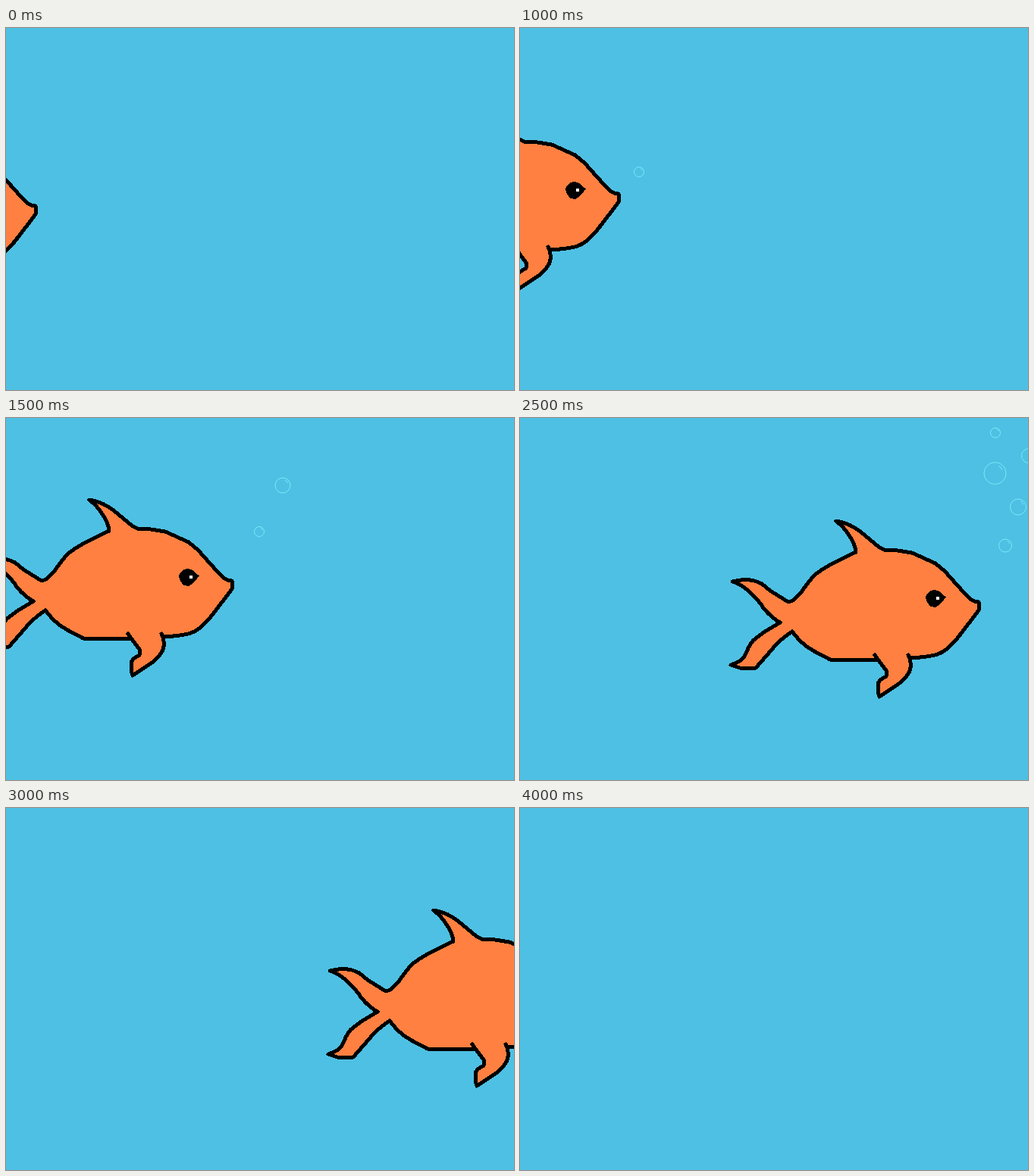
Animation of 670 by 478 pixels, one loop 4.5 s. Source, as an HTML page:

```html
<!DOCTYPE html>
<html lang="en">
<head>
<meta charset="utf-8">
<title>Swimming fish</title>
<style>
  html, body { margin: 0; height: 100%; overflow: hidden; background: #4ec0e3; }
  svg { display: block; width: 100%; height: 100%; }
  .outline { fill: #ff8040; stroke: #000; stroke-width: 5; stroke-linejoin: round; stroke-linecap: round; }
  .bubble { fill: none; stroke: #7ae9fb; stroke-width: 1; }
</style>
</head>
<body>
<svg viewBox="0 0 670 478">
  <g id="fish" shape-rendering="crispEdges">
    <!-- back, snout, belly and front fin, then tail and dorsal fin -->
    <path class="outline" d="M325 154 L343 155 362 158 393 172 405 182 430 210 439 219 444 222 450 223
      450 234 424 268 Q407 290 392 293 Q380 296 359 297 Q362 310 358 316 Q352 327 340 334 L319 348
      317 342 317 330 320 326 328 321 329 315 317 299 254 299 233 288 222 281 213 273 204 262
      Q187 273 176 287 L156 310 138 311 123 306 Q138 302 143 291 Q149 275 156 271 L168 262 188 250
      Q177 244 166 231 L163 226 Q142 200 125 196 Q148 190 164 199 L175 208 199 223 205 221
      216 210 Q231 188 238 184 Q251 174 288 157 Q287 143 270 123 L262 116 Q280 119 294 130 L307 141 318 150Z"/>
    <path class="outline" d="M317 299L313 293M359 297L357 293"/>
    <path d="M380 218L381 213 386 208 392 207 399 209 403 214 407 216 404 220 399 226 393 230 386 229 382 223Z"/>
    <circle cx="396" cy="218" r="2.5" fill="#fff"/>
  </g>
  <g id="bubbles"></g>
</svg>
<script>
const STEP = 500;

// Fish offset, and bubbles as [x, y, radius]
const poses = [
  { x: -411, y: 12, bubbles: [] },
  { x: -371, y: 4, bubbles: [] },
  { x: -320, y: -4, bubbles: [[157, 190, 7]] },
  { x: -152, y: -8, bubbles: [[365, 89, 10.5], [334, 150, 7]] },
  { x: 0, y: 0, bubbles: [[493, 58.5, 15], [452.5, 110, 10.5], [496, 125.5, 7], [472, 168, 11]] },
  { x: 155, y: 20, bubbles: [[627, 19.5, 7], [671, 50, 10], [626.5, 73, 15], [657, 117.5, 11], [640, 168.5, 9]] },
  { x: 302, y: 19, bubbles: [] },
  { x: 436, y: 9, bubbles: [] },
  { x: 700, y: 0, bubbles: [] }
];

const fish = document.getElementById("fish");
const bubbleLayer = document.getElementById("bubbles");
let shown = -1;

function bubbleMarkup([x, y, r]) {
  const glint = `M${x + r * .3} ${y - r * .65}Q${x + r * .55} ${y - r * .58} ${x + r * .62} ${y - r * .3}`;
  return `<circle class="bubble" cx="${x}" cy="${y}" r="${r - .5}"/><path class="bubble" d="${glint}"/>`;
}

function draw(now) {
  const index = Math.floor(now / STEP) % poses.length;
  if (index !== shown) {
    const pose = poses[index];
    fish.setAttribute("transform", `translate(${pose.x} ${pose.y})`);
    bubbleLayer.innerHTML = pose.bubbles.map(bubbleMarkup).join("");
    shown = index;
  }
  requestAnimationFrame(draw);
}

draw(performance.now());
</script>
</body>
</html>
```
